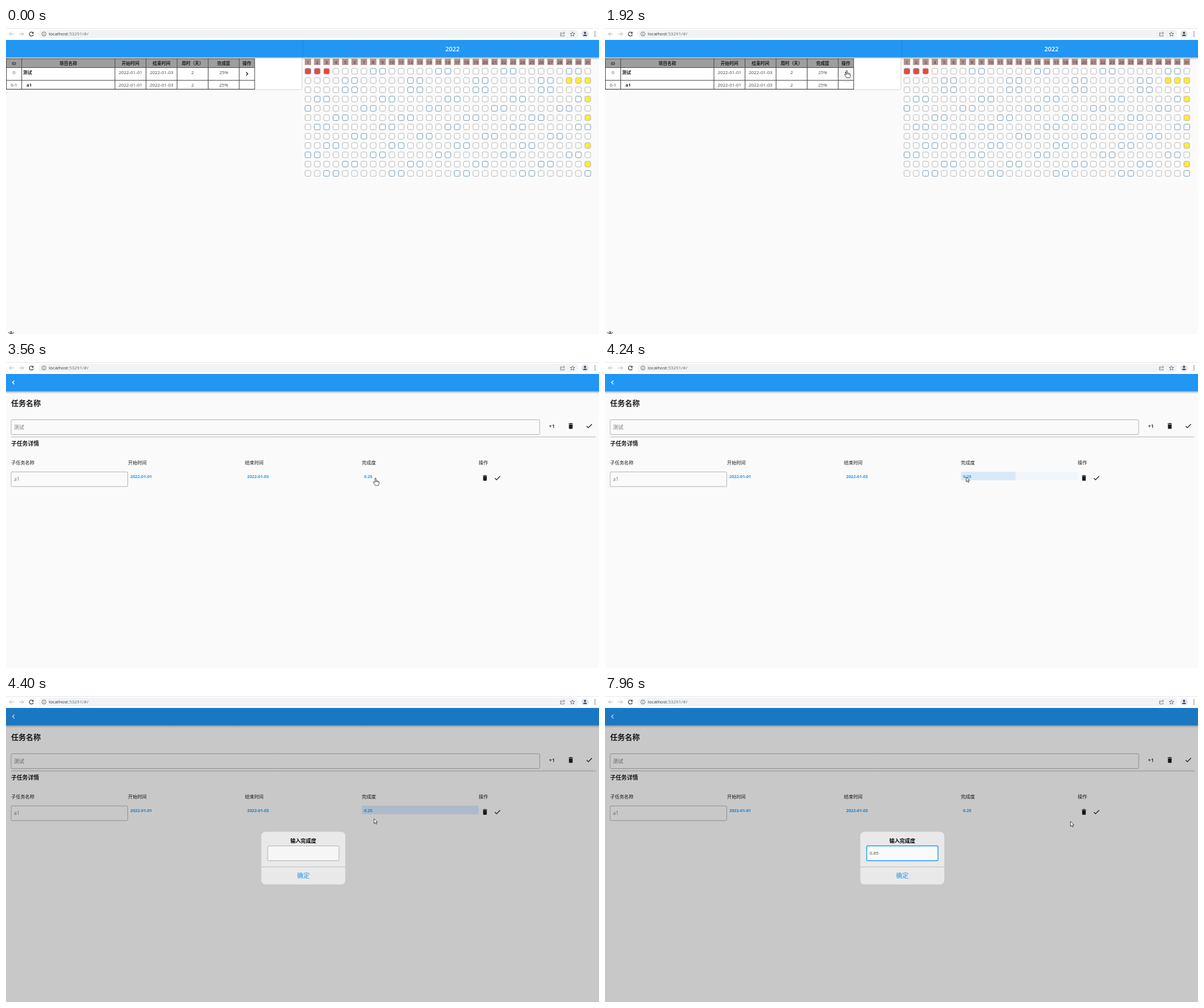
Animation of 1040x538 px, one loop 8 s. Source, as an HTML page with a canvas:

```html
<!DOCTYPE html>
<html lang="zh">
<head>
<meta charset="utf-8">
<title>2022</title>
<style>
html, body { margin: 0; width: 100%; height: 100%; overflow: hidden; background: #fafafa; }
canvas { display: block; }
</style>
</head>
<body>
<canvas id="stage" width="1040" height="538"></canvas>
<script>
const ctx = document.getElementById('stage').getContext('2d');
const LOOP = 8000, BLUE = '#2196f3', INK = '#1c1c1c', OUTLINE = '#b0b0b0';
const OPEN_PAGE = 2480, PRESS = 4120, DIALOG = 4240, FOCUS = 5460;

const clamp = v => Math.max(0, Math.min(1, v));

function rect(x, y, w, h, color) {
  ctx.fillStyle = color;
  ctx.fillRect(x, y, w, h);
}

function box(x, y, w, h, r, fill, stroke, lineWidth = 1) {
  ctx.beginPath();
  ctx.roundRect(x, y, w, h, r);
  if (fill) { ctx.fillStyle = fill; ctx.fill(); }
  if (stroke) { ctx.strokeStyle = stroke; ctx.lineWidth = lineWidth; ctx.stroke(); }
}

function disc(x, y, r, color) {
  ctx.beginPath();
  ctx.arc(x, y, r, 0, 7);
  ctx.fillStyle = color;
  ctx.fill();
}

function text(s, x, y, size, color = INK, weight = 400, align = 'left') {
  ctx.font = `${weight} ${size}px "Open Sans", "Noto Sans CJK SC", "Noto Sans CJK", sans-serif`;
  ctx.textAlign = align;
  ctx.fillStyle = color;
  ctx.fillText(s, x, y);
}

// Strokes or fills an SVG path at an offset
function shape(d, x, y, stroke, lineWidth = 1, fill) {
  const path = new Path2D(d);
  ctx.save();
  ctx.translate(x, y);
  ctx.lineWidth = lineWidth;
  if (fill) { ctx.fillStyle = fill; ctx.fill(path); }
  if (stroke) { ctx.strokeStyle = stroke; ctx.stroke(path); }
  ctx.restore();
}

function browserBar() {
  rect(0, 0, 1040, 21, '#fff');
  rect(0, 0, 1040, 1, '#e4e5e7');
  box(57, 3, 947, 15, 7.5, '#f1f3f4');
  shape('M4 0H-4M0 -4L-4 0L0 4', 10, 10.5, '#b4b6b9');
  shape('M-4 0H4M0 -4L4 0L0 4', 27, 10.5, '#b4b6b9');
  shape('M2.6 -2.2A3.5 3.5 0 1 0 3.4 1', 44.5, 10.5, '#46494d', 1.3);
  shape('M3.9 -4.2V-.6H.3Z', 44.5, 10.5, null, 1, '#46494d');
  shape('M3.6 0A3.6 3.6 0 1 1 -3.6 0A3.6 3.6 0 1 1 3.6 0M0 -.5V2M0 -2V-1', 66.5, 10.5, '#5f6368', .9);
  text('localhost', 75, 13.3, 8, '#303338');
  const hostWidth = ctx.measureText('localhost').width;
  text(':53291/#/', 75 + hostWidth, 13.3, 8, '#686c71');
  shape('M-1 -2H-3.5V3.5H3V1.5M-1.5 1.2C-1.2 -1 .5 -1.8 3.5 -1.8M1.5 -4L3.8 -1.8L1.5 .4', 976, 10.5, '#5f6368', .8);
  shape('M0 -4L1.1 -1.3L4 -1.2L1.8 .7L2.5 3.5L0 1.9L-2.5 3.5L-1.8 .7L-4 -1.2L-1.1 -1.3Z', 993.5, 10.8, '#5f6368', .9);
  disc(1015.5, 10.5, 6.5, '#dfe5ee');
  disc(1015.5, 8.6, 1.9, '#3b4452');
  shape('M-3.5 3.2C-3.5 -.2 3.5 -.2 3.5 3.2Z', 1015.5, 10.8, null, 1, '#3b4452');
  for (const y of [7, 10.5, 14]) disc(1033, y, .9, '#5f6368');
}

function appBar() {
  const shadow = ctx.createLinearGradient(0, 51, 0, 56);
  shadow.addColorStop(0, 'rgba(0,0,0,.3)');
  shadow.addColorStop(1, 'rgba(0,0,0,0)');
  rect(0, 51, 1040, 5, shadow);
  rect(0, 21, 1040, 30.5, BLUE);
}

function taskTable() {
  box(0, 53, 519, 55.5, 2, '#fff', '#d6d6d6');
  const edges = [.5, 27.5, 191, 245.5, 300, 354.5, 409, 436];
  const rows = [
    ['ID', '项目名称', '开始时间', '结束时间', '用时（天）', '完成度', '操作'],
    ['0', '测试', '2022-01-01', '2022-01-03', '2', '25%', ''],
    ['0-1', 'a1', '2022-01-01', '2022-01-03', '2', '25%', '']
  ];
  const baselines = [65, 81, 103];
  rect(0, 54, 436, 15.5, '#9e9e9e');
  rows.forEach((row, r) => row.forEach((s, c) => {
    if (r && c === 1) text(s, r === 1 ? 30 : 36, baselines[r], 7.8, INK, 700);
    else text(s, (edges[c] + edges[c + 1]) / 2, baselines[r], r ? 8 : 7.7, r ? '#444' : INK, r ? 400 : 600, 'center');
  }));
  for (const x of edges) rect(x - .5, 53.5, 1.1, 54.5, '#4b514b');
  for (const y of [54, 69.5, 92, 107.5]) rect(0, y - .5, 436.5, 1.1, '#4b514b');
}

function calendar() {
  for (let day = 1; day <= 31; day++) {
    const x = 529.5 + (day - 1) * 16.36;
    rect(x - 5.5, 54, 11, 11, '#b3928f');
    text(day, x, 62.6, 7.6, '#3a3434', 400, 'center');
    for (let month = 0; month < 12; month++) {
      const date = new Date(2022, month, day);
      const missing = date.getMonth() !== month;
      const weekend = !missing && date.getDay() % 6 === 0;
      const fill = missing ? '#ffeb3b' : !month && day < 4 ? '#f44336' : '#fff';
      box(x - 5, 71 + month * 16.33, 10, 10, 2.3, fill, weekend ? '#6f97b3' : '#b5b5b5');
    }
  }
}

function overview(t) {
  appBar();
  rect(520, 21, 1, 30.5, '#1d86da');
  text('2022', 783, 41, 11, '#fff', 600, 'center');
  taskTable();
  calendar();
  shape('M-1.4 -3L1.6 0L-1.4 3', 422.5, 80.5, INK, 1.4);
  if (t >= 1840) disc(423, 80.5, 16, `rgba(0,0,0,${t >= 2320 ? .1 : .04})`);
  shape('M0 -5V5M-5 -2.8L5 2.8M-5 2.8L5 -2.8M-2 -4.5L0 -2.5L2 -4.5', 9, 538, '#222');
}

function trash(x, y) {
  shape('M-3.8 -4.4H-1.8L-1.2 -5.1H1.2L1.8 -4.4H3.8V-3.3H-3.8ZM-3.2 -2.7H3.2V3.8C3.2 4.7 2.8 5 2.1 5H-2.1C-2.8 5 -3.2 4.7 -3.2 3.8Z', x, y, null, 1, INK);
}

function check(x, y) {
  shape('M-4.6 .2L-1.7 3.1L4.6 -3.3', x, y, INK, 1.3);
}

function pressRipple(t) {
  if (t < PRESS || t >= 4800) return;
  const fade = clamp((4800 - t) / 400);
  ctx.save();
  ctx.beginPath();
  ctx.roundRect(624, 193, 205, 15, 2);
  ctx.clip();
  rect(624, 193, 205, 15, `rgba(33,150,243,${.04 * fade})`);
  disc(633, 201, (t - PRESS) * .725, `rgba(33,150,243,${.12 * fade})`);
  ctx.restore();
}

function details(t) {
  appBar();
  shape('M1.7 -3.3L-1.6 0L1.7 3.3', 13, 36, '#fff', 1.4);
  text('任务名称', 9, 77, 13, INK, 700);
  box(9, 101.5, 927, 26, 2, null, OUTLINE);
  text('测试', 14, 118, 9, '#777');
  text('+1', 957.5, 115.7, 9, INK, 600, 'center');
  trash(990.5, 112.4);
  check(1023, 112.5);
  rect(9, 130.5, 1025, 2.5, '#dcdcdc');
  text('子任务详情', 9, 146.8, 9.8, INK, 700);
  ['子任务名称', '开始时间', '结束时间', '完成度', '操作']
    .forEach((s, i) => text(s, 9 + 205 * i, 180, 8.2, INK, 500));
  box(9, 193.2, 204.5, 25.8, 2, null, OUTLINE);
  text('a1', 14, 209, 8.6, '#777');
  pressRipple(t);
  ['2022-01-01', '2022-01-03', '0.25']
    .forEach((s, i) => text(s, 218 + 205 * i, 203.8, 7.3, BLUE, 700));
  trash(840, 203.8);
  check(862, 204);
}

function dialog(t) {
  const p = clamp((t - DIALOG) / 160);
  if (!p) return;
  rect(0, 21, 1040, 517, `rgba(0,0,0,${.2 * p})`);
  const scale = 1 + .3 * (1 - p) ** 1.6;
  const focused = t >= FOCUS;
  ctx.save();
  ctx.globalAlpha = p ** 2.7;
  ctx.translate(521.4, 285);
  ctx.scale(scale, scale);
  ctx.translate(-521.4, -285);
  box(447.8, 238.8, 147.2, 92.4, 7, '#e9e9e9');
  text('输入完成度', 521.4, 258.3, 9.1, '#000', 700, 'center');
  box(459, 263.5, 125, 26, 1.5, focused ? '#fafafa' : '#f6f6f6', focused ? BLUE : OUTLINE, focused ? 1.4 : 1);
  rect(447.8, 300, 147.2, 1, '#bfbfbf');
  text('确定', 521.4, 319.8, 11, BLUE, 400, 'center');
  if (focused) {
    const typed = '0.85'.slice(0, [6320, 6560, 6960, 7120].filter(k => t >= k).length);
    text(typed, 464, 279, 8, '#444');
    const caretOn = t < 5960 || t >= 6320 && t < 7620;
    if (caretOn) rect(464 + ctx.measureText(typed).width, 271, 1, 9, BLUE);
  }
  ctx.restore();
}

// Pointer stops: time, x, y
const pointerPath = [
  [120, 866, 508], [280, 689, 464], [440, 689, 464], [840, 353, 191], [1000, 372, 197],
  [1320, 372, 197], [1920, 424, 74.5], [2000, 424, 74.5], [2080, 424, 75.5], [2480, 424, 75.5],
  [2880, 453, 229], [3160, 453, 229], [3560, 648, 204], [3720, 651, 170], [3960, 633, 200],
  [4080, 633, 200], [4320, 633, 202], [4400, 645, 215], [4880, 545, 270], [5640, 523.5, 271],
  [7480, 523.5, 271], [7640, 535, 291], [7960, 816, 220], [LOOP, 816, 220]
];

function pointer(t) {
  if (t < pointerPath[0][0]) return;
  const i = pointerPath.findIndex(k => k[0] > t);
  const [t0, x0, y0] = pointerPath[i - 1], [t1, x1, y1] = pointerPath[i];
  const p = (t - t0) / (t1 - t0);
  const x = x0 + (x1 - x0) * p, y = y0 + (y1 - y0) * p;
  const within = (l, top, r, b) => x >= l && x <= r && y >= top && y <= b;
  const onButton = t < OPEN_PAGE ? within(408, 66, 440, 96)
    : t < DIALOG && within(624, 193, 829, 209);
  if (onButton) {
    shape('M-1 6.5V1C-1 -.5 1 -.5 1 1V5C2 4.2 3 4.6 3 5.5C4 4.9 4.8 5.4 4.8 6.2C5.8 5.8 6.3 6.4 6.3 7.2V9.5C6.3 11 5.2 11.6 5.2 13H-.5C-.7 11.2 -3.8 9 -4 7.4C-4 6.3 -2.6 6.2 -1 8ZM1 5V7M3 5.5V7.3M4.8 6.2V7.6', x, y, '#222', .8, '#fff');
  } else if (t >= DIALOG && within(459, 263, 584, 290)) {
    shape('M-2 -4H-.5L0 -3.5L.5 -4H2M0 -3.5V3.5M-2 4H-.5L0 3.5L.5 4H2', x, y, '#333', .9);
  } else {
    shape('M.4 .5V9.2L2.4 7.4L3.8 10.4L5.2 9.8L3.9 6.8H6.6Z', x, y, '#222', .8, '#fff');
  }
}

// The picture advances in 80 ms steps, counted from these times
const stepStarts = [0, 120, 1920, 3240, 4240, 5320, 6320, 7560];

function draw(now) {
  const time = now % LOOP;
  const start = stepStarts.findLast(s => s <= time);
  const t = start + Math.floor((time - start) / 80) * 80;
  rect(0, 0, 1040, 538, '#fafafa');
  if (t < OPEN_PAGE) overview(t);
  else details(t);
  dialog(t);
  browserBar();
  pointer(t);
  requestAnimationFrame(draw);
}
requestAnimationFrame(draw);
</script>
</body>
</html>
```
